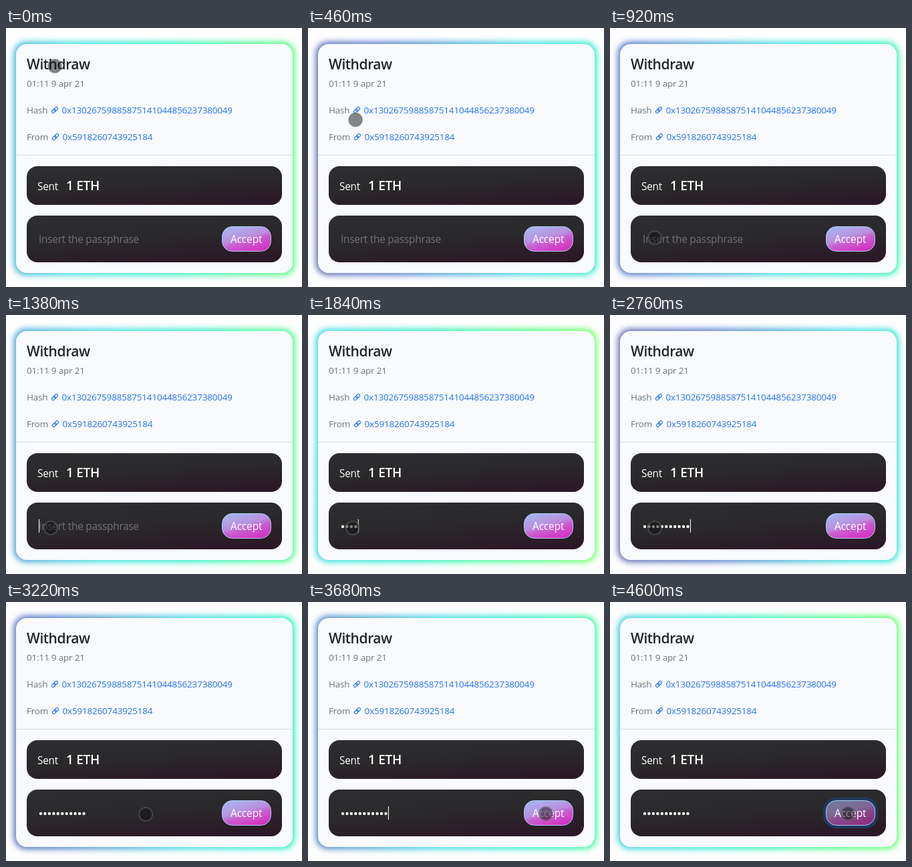
An HTML page for the animation above (4680 ms loop, 443 px wide and 388 px high).

```html
<!DOCTYPE html>
<html lang="en">
<head>
<meta charset="utf-8">
<title>Withdraw</title>
<style>
  html, body { margin: 0; width: 100%; height: 100%; overflow: hidden; background: #fefefe; }
  svg { display: block; width: 443px; height: 388px; }
  text { font: 13.5px "Open Sans", "Noto Sans", sans-serif; letter-spacing: -.19px; fill: #6c757d; }
  .title { font-size: 21px; font-weight: 600; letter-spacing: -.45px; fill: #212529; }
  .link { fill: #2472f2; }
  .icon { fill: none; stroke: #2472f2; stroke-width: 1.1; }
  .big { font-size: 15.4px; letter-spacing: -.24px; fill: #fff; }
  .amount { font-size: 19px; font-weight: 600; letter-spacing: -.3px; fill: #fff; }
  .button { font-weight: 500; letter-spacing: -.1px; }
  .hint { fill: #727074; }
</style>
</head>
<body>
<svg viewBox="0 0 443 388">
  <defs>
    <linearGradient id="rainbow" gradientUnits="userSpaceOnUse" x1="0" x2="932">
      <stop offset="0" stop-color="#6858a0"/>
      <stop offset=".22" stop-color="#4a74c8"/>
      <stop offset=".44" stop-color="#30dce0"/>
      <stop offset=".59" stop-color="#20f0c0"/>
      <stop offset=".81" stop-color="#50ff70"/>
      <stop offset="1" stop-color="#b0ff40"/>
    </linearGradient>
    <linearGradient id="dark" x1=".3" y1="0" x2=".7" y2="1">
      <stop offset="0" stop-color="#2d2d2f"/>
      <stop offset=".5" stop-color="#2a282a"/>
      <stop offset="1" stop-color="#2a1927"/>
    </linearGradient>
    <linearGradient id="pink" x1=".2" y1="0" x2=".75" y2="1">
      <stop offset="0" stop-color="#a9b4ee"/>
      <stop offset=".45" stop-color="#b98fe0"/>
      <stop offset=".6" stop-color="#c95fd0"/>
      <stop offset="1" stop-color="#d430c0"/>
    </linearGradient>
    <filter id="blur" x="-10%" y="-10%" width="120%" height="120%"><feGaussianBlur stdDeviation="5"/></filter>
    <g id="chain" class="icon" transform="rotate(-45)">
      <rect x="-5.6" y="-2.1" width="6.6" height="4.2" rx="2.1"/>
      <rect x="-1" y="-2.1" width="6.6" height="4.2" rx="2.1"/>
    </g>
  </defs>

  <rect x="12" y="21" width="420" height="349" rx="18" fill="url(#rainbow)" filter="url(#blur)"/>
  <rect x="15" y="24" width="414" height="343" rx="16" fill="#f8fafe"/>
  <path d="M15 190.5H429" stroke="#d6dee6"/>

  <text class="title" x="31" y="62">Withdraw</text>
  <text x="31" y="88">01:11 9 apr 21</text>
  <text x="31" y="128">Hash</text>
  <use href="#chain" x="0" y="0" transform="translate(73 123)"/>
  <text class="link" x="83.5" y="128">0x13026759885875141044856237380049</text>
  <text x="31" y="168">From</text>
  <use href="#chain" transform="translate(74 163)"/>
  <text class="link" x="84.5" y="168">0x5918260743925184</text>

  <rect x="31" y="207" width="382" height="58" rx="16" fill="url(#dark)"/>
  <text class="big" x="47" y="243">Sent</text>
  <text class="amount" x="90" y="243">1 ETH</text>

  <rect x="31" y="281" width="382" height="70" rx="16" fill="url(#dark)"/>
  <text id="hint" class="big hint" x="49" y="322">Insert the passphrase</text>
  <path id="dots" fill="none" stroke="#fff" stroke-width="4.4" stroke-linecap="round" stroke-dasharray="0 6.45"/>
  <path id="caret" stroke="#fff" d="M0 306V326"/>

  <rect id="ring" x="321" y="295" width="78" height="42" rx="17" fill="none" stroke="#213760" stroke-width="4"/>
  <rect x="323.5" y="297.5" width="73" height="37" rx="15" fill="url(#pink)"/>
  <rect id="shade" x="323.5" y="297.5" width="73" height="37" rx="15" fill="#2b2b2d" opacity=".42"/>
  <rect x="323.5" y="297.5" width="73" height="37" rx="15" fill="none" stroke="#a5cdf2"/>
  <text class="big button" x="336" y="322">Accept</text>

  <circle id="cursor" r="10" fill="#101012" fill-opacity=".5" stroke="#666" stroke-opacity=".5" stroke-width="2"/>
</svg>
<script>
const LOOP = 4680, FOCUS = 1050, TYPE = 1440, KEY = 102, LENGTH = 11, BLINK = 530, PRESS = 4250;
const DONE = TYPE + KEY * (LENGTH - 1);
const $ = id => document.getElementById(id);
const rainbow = $('rainbow'), hint = $('hint'), dots = $('dots'), caret = $('caret');
const ring = $('ring'), shade = $('shade'), cursor = $('cursor');

// [time, value...]; two points at one time make a jump
const HUE = [[0, 4.35], [220, 4.22], [220, 5.15], [920, 4.8], [1840, 4.15], [2600, 3.9],
             [2600, 5.18], [2760, 5.1], [3680, 4.65], [4600, 4.22], [LOOP, 4.18]];
const POINTER = [[0, 73, 57], [200, 73, 57], [900, 67, 314], [1100, 67, 319],
                 [2850, 67, 319], [3600, 356, 317], [LOOP, 356, 317]];

const linear = u => u;
const smooth = u => u * u * (3 - 2 * u);

function track(keys, t, ease) {
  const i = keys.findIndex(k => k[0] > t);
  const a = keys[i - 1], b = keys[i];
  const u = ease((t - a[0]) / (b[0] - a[0]));
  return a.slice(1).map((v, n) => v + (b[n + 1] - v) * u);
}

const show = (el, on) => el.setAttribute('visibility', on ? 'visible' : 'hidden');

function draw(t) {
  const [hue] = track(HUE, t, linear);
  rainbow.setAttribute('gradientTransform', `translate(${15 - (5.3 - hue) * 345})`);

  const count = Math.max(0, Math.min(LENGTH, Math.floor((t - TYPE) / KEY) + 1));
  show(hint, !count);
  show(dots, count);
  dots.setAttribute('d', `M52 317h${Math.max(0, count - 1) * 6.45 + .1}`);

  const idle = Math.max(0, t - DONE);
  show(caret, t >= FOCUS && t < PRESS && Math.floor(idle / BLINK) % 2 === 0);
  caret.setAttribute('transform', `translate(${49.5 + count * 6.45})`);

  show(ring, t >= PRESS);
  show(shade, t >= PRESS);
  cursor.setAttribute('transform', `translate(${track(POINTER, t, smooth)})`);
}

function frame() {
  draw(performance.now() % LOOP);
  requestAnimationFrame(frame);
}
frame();
</script>
</body>
</html>
```
